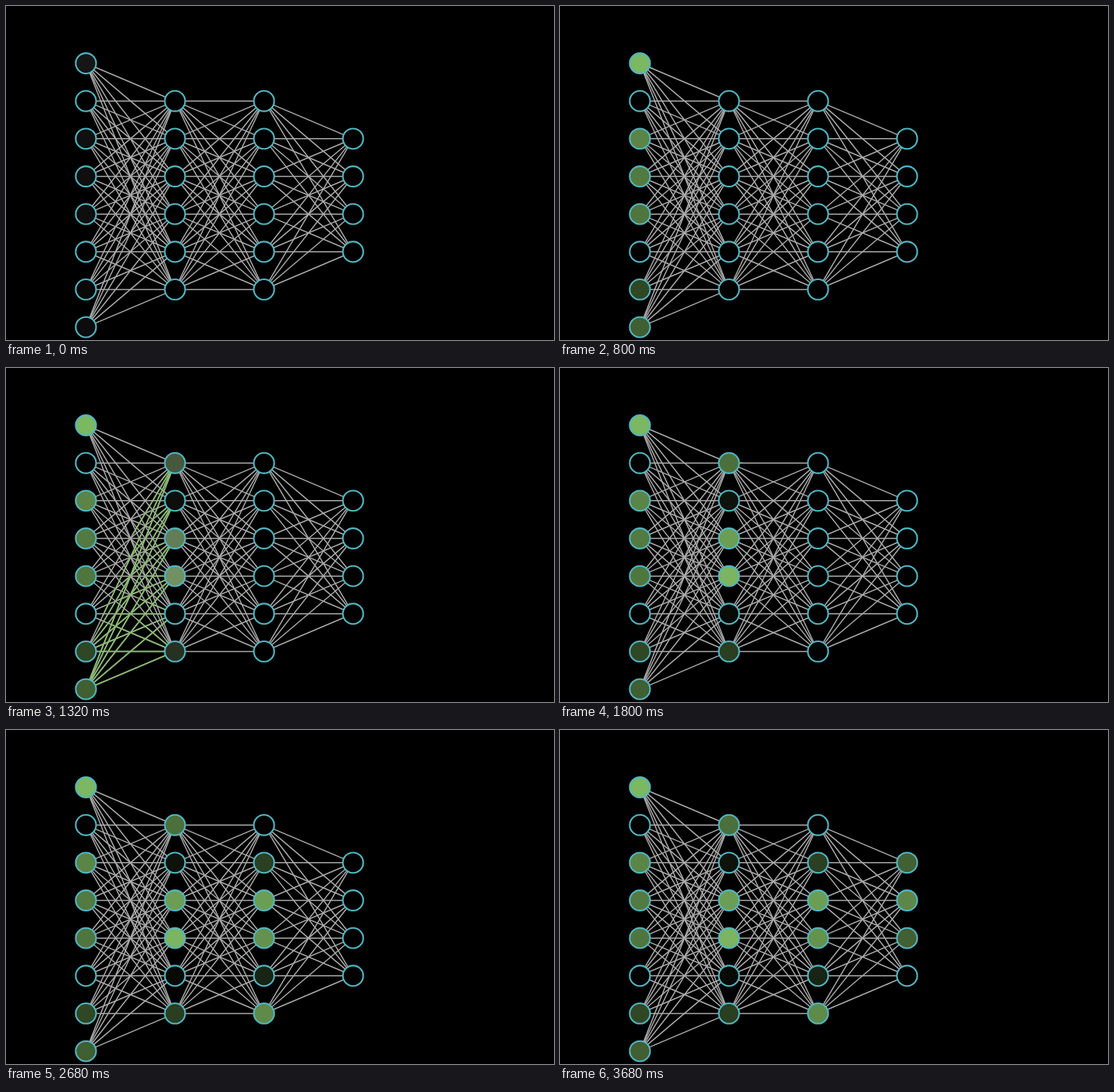
Recreate the animation shown at these times as an HTML page with a canvas. Size 720 px wide and 440 px high, loop 3.72 s.

```html
<!DOCTYPE html>
<html lang="en">
<head>
<meta charset="utf-8">
<title>Feed forward</title>
<style>
  html, body { margin: 0; width: 100%; height: 100%; overflow: hidden; background: #000; }
  canvas { display: block; }
</style>
</head>
<body>
<canvas id="stage" width="720" height="440"></canvas>
<script>
const ctx = document.getElementById('stage').getContext('2d');
const LOOP = 3720, STEP = 40, RUN = 1000, LEAD = 280;
const RADIUS = 13.4, LEFT = 105, COLUMN = 117, MIDDLE = 249.3, ROW = 49.65;
const GREEN = [131, 193, 103];

const activations = [
  [0.95, 0.01, 0.69, 0.63, 0.61, 0.01, 0.37, 0.49],
  [0.58, 0.1, 0.82, 0.94, 0.05, 0.32],
  [0.01, 0.33, 0.82, 0.76, 0.19, 0.72],
  [0.5, 0.7, 0.5, 0.01]
];
const layers = activations.map((values, column) => values.map((value, row) => ({
  value,
  x: LEFT + column * COLUMN,
  y: MIDDLE + (row - (values.length - 1) / 2) * ROW
})));

// Edges run from rim to rim, ordered by their starting neuron.
const edgeGroups = layers.slice(1).map((next, i) => layers[i].flatMap(a => next.map(b => {
  const dx = b.x - a.x, dy = b.y - a.y, k = RADIUS / Math.hypot(dx, dy);
  return { x: a.x + dx * k, y: a.y + dy * k, dx: dx * (1 - 2 * k), dy: dy * (1 - 2 * k) };
})));

const clamp = v => Math.min(1, Math.max(0, v));
const sigmoid = v => 1 / (1 + Math.exp(-v));
const smooth = t => clamp((sigmoid(10 * (t - 0.5)) - sigmoid(-5)) / (1 - 2 * sigmoid(-5)));

function strokeEdge(edge, from, to) {
  ctx.beginPath();
  ctx.moveTo(edge.x + edge.dx * from, edge.y + edge.dy * from);
  ctx.lineTo(edge.x + edge.dx * to, edge.y + edge.dy * to);
  ctx.stroke();
}

// Each edge grows from its start, then vanishes towards its end, with a lag along the group.
function drawPulse(group, progress) {
  ctx.strokeStyle = '#8ab873';
  ctx.lineWidth = 1.8;
  group.forEach((edge, i) => {
    const p = clamp(2 * progress - i / group.length);
    const from = clamp(3 * p - 2), to = clamp(3 * p);
    if (to > from) strokeEdge(edge, from, to);
  });
}

function drawNeuron({ x, y, value }, progress) {
  const shade = GREEN.map(c => Math.round((255 + (c - 255) * progress) * value * progress));
  ctx.beginPath();
  ctx.arc(x, y, RADIUS, 0, 2 * Math.PI);
  ctx.fillStyle = `rgb(${shade})`;
  ctx.fill();
  ctx.strokeStyle = '#52b6c2';
  ctx.lineWidth = 2.1;
  ctx.stroke();
}

function draw(time) {
  const progress = layers.map((_, i) => smooth(clamp((time + LEAD) / RUN - i)));
  ctx.fillStyle = '#000';
  ctx.fillRect(0, 0, 720, 440);
  ctx.strokeStyle = '#acacac';
  ctx.lineWidth = 1.5;
  edgeGroups.forEach(group => group.forEach(edge => strokeEdge(edge, 0, 1)));
  edgeGroups.forEach((group, i) => drawPulse(group, progress[i + 1]));
  layers.forEach((layer, i) => layer.forEach(neuron => drawNeuron(neuron, progress[i])));
}

const start = performance.now();
function tick() {
  const time = (performance.now() - start) % LOOP;
  draw(Math.floor(time / STEP) * STEP);
  requestAnimationFrame(tick);
}
tick();
</script>
</body>
</html>
```
